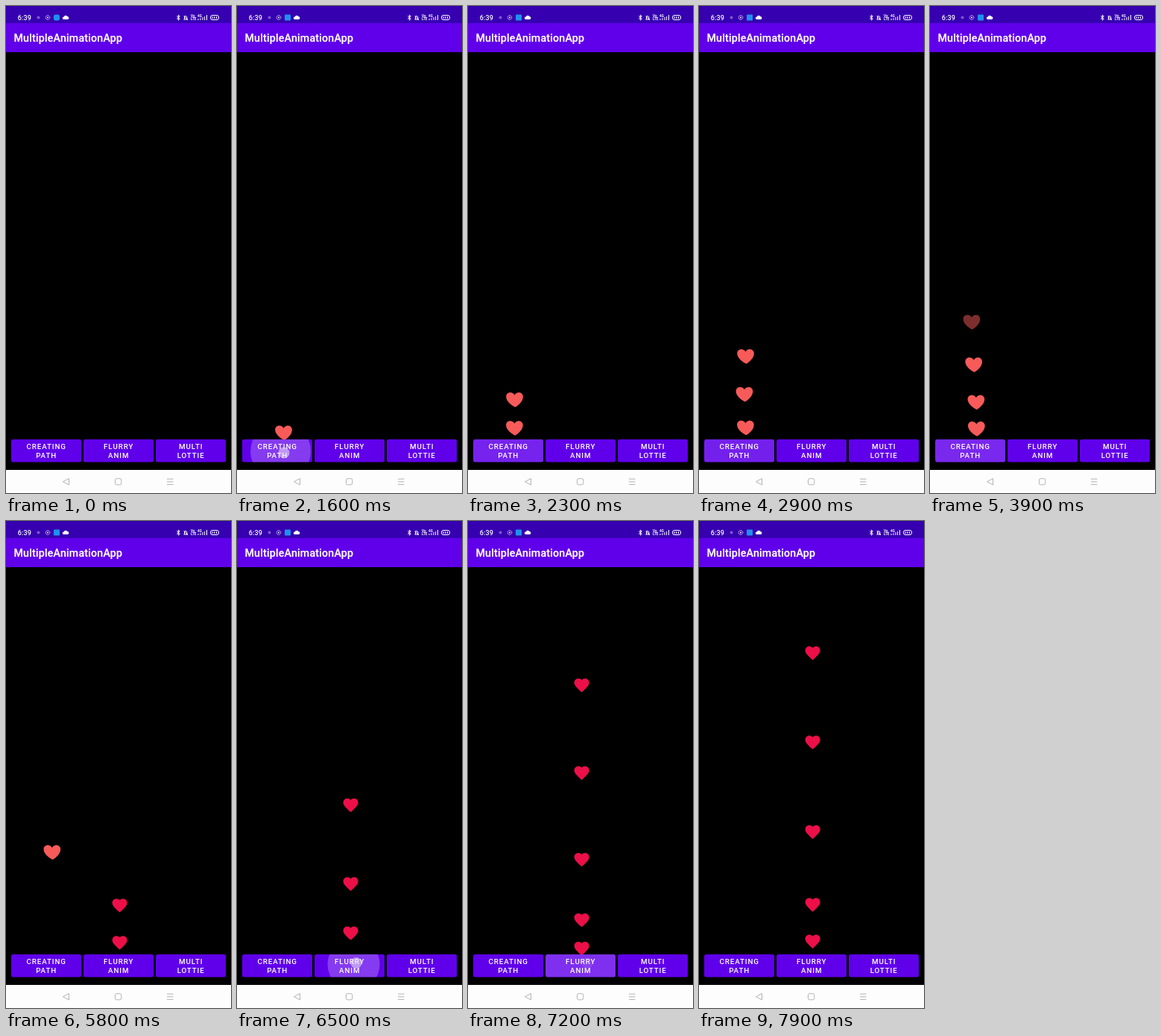
An HTML page that plays this animation: 302 by 654 pixels, repeating every 8000 ms.

```html
<!DOCTYPE html>
<html lang="en">
<head>
<meta charset="utf-8">
<title>Heart animations</title>
<style>
  html, body { margin: 0; width: 100%; height: 100%; overflow: hidden; background: #000; }
  svg { display: block; width: 302px; height: 654px; }
  text { font-family: Roboto, "Noto Sans", sans-serif; fill: #fff; }
  .title { font-size: 14.2px; font-weight: 500; letter-spacing: .2px; stroke: #fff; stroke-width: .2px; }
  .label { font-size: 9.8px; font-weight: 500; letter-spacing: .875px; text-anchor: middle; }
  .clock { font-size: 9px; font-weight: 500; letter-spacing: .1px; }
  .tiny { font-size: 4.6px; font-weight: 700; }
  .line { fill: none; stroke: #fff; stroke-width: 1; }
  .nav { fill: none; stroke: #b2b2b2; stroke-width: 1; }
</style>
</head>
<body>
<svg viewBox="0 0 302 654">
  <defs>
    <path id="coral" fill="#f75b59" d="M.8 9.9C-4 7.6-11.4 2.2-11.4-4.1C-11.4-7.6-8.8-9.7-5.9-9.7C-3.2-9.7-1.2-8.3 0-6.2C1.2-8.6 3.5-9.9 6.1-9.7C9.3-9.4 11.4-6.9 11.3-3.8C11 2.4 4.9 7.4 .8 9.9Z"/>
    <path id="crimson" fill="#ec0f48" d="M0 9.2L-1.45 7.9C-6.6 3.2-10 .1-10-3.7C-10-6.8-7.6-9.2-4.5-9.2C-2.8-9.2-1.1-8.4 0-7.1C1.1-8.4 2.8-9.2 4.5-9.2C7.6-9.2 10-6.8 10-3.7C10 .1 6.6 3.2 1.45 7.9Z"/>
  </defs>

  <rect width="302" height="654" fill="#000"/>
  <g id="hearts"></g>

  <rect width="302" height="23" fill="#3600b1"/>
  <rect y="23" width="302" height="39" fill="#6000ea"/>
  <text class="title" x="10.5" y="47.5">MultipleAnimationApp</text>

  <text class="clock" x="15.8" y="18.5">6:39</text>
  <circle cx="43.5" cy="15.5" r="2" fill="#fff" opacity=".35"/>
  <circle cx="56" cy="15.5" r="2.8" class="line" stroke-dasharray="1.5 .7" opacity=".85"/>
  <circle cx="56" cy="15.5" r="1" fill="#fff"/>
  <rect id="badge" x="64" y="11.5" width="8" height="8" fill="#2090ee"/>
  <path d="M77.5 18a1.8 1.8 0 0 1 .2-3.6a2.5 2.5 0 0 1 4.5-.3a2 2 0 0 1 .8 3.9Z" fill="#fff"/>
  <path d="M229.3 13.6l4 3.7l-2 1.8v-7l2 1.7l-4 3.7" class="line"/>
  <path d="M238.5 18h5.5M239.5 18v-3q1.7-3.2 3.4 0v3M238.8 13l5 6" class="line" stroke-width=".8"/>
  <text class="tiny" x="248" y="15.4">Vo</text>
  <text class="tiny" x="248" y="19.4">LTE</text>
  <text class="tiny" x="257" y="15.4">4G</text>
  <path d="M258 19v-2M261 19v-2.8M264 19v-4M266.7 19v-5M269.5 19v-7" class="line" stroke-width="1.3"/>
  <rect x="274.5" y="12.5" width="11" height="6" rx="2.5" class="line"/>
  <path d="M277 14v3M279.7 14v3M282.4 14v3" class="line" stroke-width="1.4"/>

  <g id="buttons"></g>

  <rect y="623" width="302" height="31" fill="#fdfdfd"/>
  <path class="nav" d="M84.5 634.5v8.6l-8-4.3Z" stroke-linejoin="round"/>
  <rect class="nav" x="146.5" y="634.7" width="8.3" height="8.2" rx="2"/>
  <path class="nav" d="M216 635.2h8.5M216 638.9h8.5M216 642.6h8.5"/>
</svg>
<script>
const LOOP = 8000, STEP = 100;
const $ = id => document.getElementById(id);
const clamp = v => Math.max(0, Math.min(1, v));

function add(parent, tag, attrs, text = "") {
  const el = document.createElementNS("http://www.w3.org/2000/svg", tag);
  set(el, attrs);
  el.textContent = text;
  return parent.appendChild(el);
}
function set(el, attrs) {
  for (const key in attrs) el.setAttribute(key, attrs[key]);
}

// Height gained: speeds up for `ramp` seconds, then stays at `speed`.
const rise = (s, ramp, speed) =>
  s < ramp ? speed * s * s / (2 * ramp) : speed * (s - ramp / 2);

// Seconds from a heart's start: `tap` of the finger, then it shows a moment later.
const SHOW = .05;
const kinds = {
  coral: {
    tap: .2, life: 2.2, fade: .34, button: 0,
    place(s, drift) {
      const d = rise(s, .924, 97);
      return [62.6 - drift * Math.pow(d / 174, 1.4), 576.6 - d];
    }
  },
  crimson: {
    tap: 0, life: 2.72, fade: .12, button: 1,
    place: s => [152.6, 576.8 - rise(s, 1.45, 230)]
  }
};

// [start in ms, sideways drift]
const starts = {
  coral: [[1345, 0], [1870, 8], [2460, 9], [2980, 4.5], [3490, 13], [3980, 1]],
  crimson: [[4927], [5439], [5960], [6484], [7021], [7510]]
};

const hearts = Object.keys(starts).flatMap(name =>
  starts[name].map(([start, drift]) => ({
    ...kinds[name], start, drift,
    el: add($("hearts"), "use", { href: "#" + name })
  })));

const buttons = [["CREATING", "PATH"], ["FLURRY", "ANIM"], ["MULTI", "LOTTIE"]].map((words, i) => {
  const x = 7 + 97 * i, mid = x + 47;
  const box = { x, y: 582, width: 94, height: 30.5, rx: 2.5 };
  const g = $("buttons");
  add(add(g, "clipPath", { id: "clip" + i }), "rect", box);
  add(g, "rect", { ...box, fill: "#6000ea" });
  const ripple = add(add(g, "g", { "clip-path": `url(#clip${i})` }), "circle", { fill: "#fff" });
  words.forEach((word, n) =>
    add(g, "text", { class: "label", x: mid + .2, y: 595.4 + 11.6 * n }, word));
  const dot = add(g, "circle", { r: 7.5, fill: "#eee8f6" });
  return { mid, ripple, dot, touch: i ? [160, 593.5] : [63, 600] };
});

function drawHeart(h, t) {
  const s = (t - h.start) / 1000;
  const shown = s >= h.tap + SHOW && s < h.life;
  h.el.style.display = shown ? "" : "none";
  if (!shown) return;
  const [x, y] = h.place(s, h.drift);
  set(h.el, { transform: `translate(${x} ${y})`, opacity: clamp((h.life - s) / h.fade) });
}

function drawButton(b, i, t) {
  const ages = hearts.filter(h => h.button === i)
    .map(h => (t - h.start) / 1000 - h.tap)
    .filter(a => a > -.12 && a < .36);
  const a = ages.length ? ages[ages.length - 1] : 9;
  const p = clamp((a + .12) / .25);
  const [x, y] = b.touch;
  set(b.ripple, {
    cx: x + (b.mid - x) * p * .7,
    cy: y + (597 - y) * p,
    r: 16 + 35 * p,
    opacity: .23 * clamp((a + .12) / .075) * clamp((.36 - a) / .22)
  });
  set(b.dot, { cx: x, cy: y, opacity: .55 * clamp((.2 - a) / .1) });
}

function draw() {
  const t = Math.floor(performance.now() % LOOP / STEP) * STEP;
  hearts.forEach(h => drawHeart(h, t));
  buttons.forEach((b, i) => drawButton(b, i, t));
  set($("badge"), { rx: t < 1100 ? 2.5 : .8 });
  requestAnimationFrame(draw);
}
draw();
</script>
</body>
</html>
```
